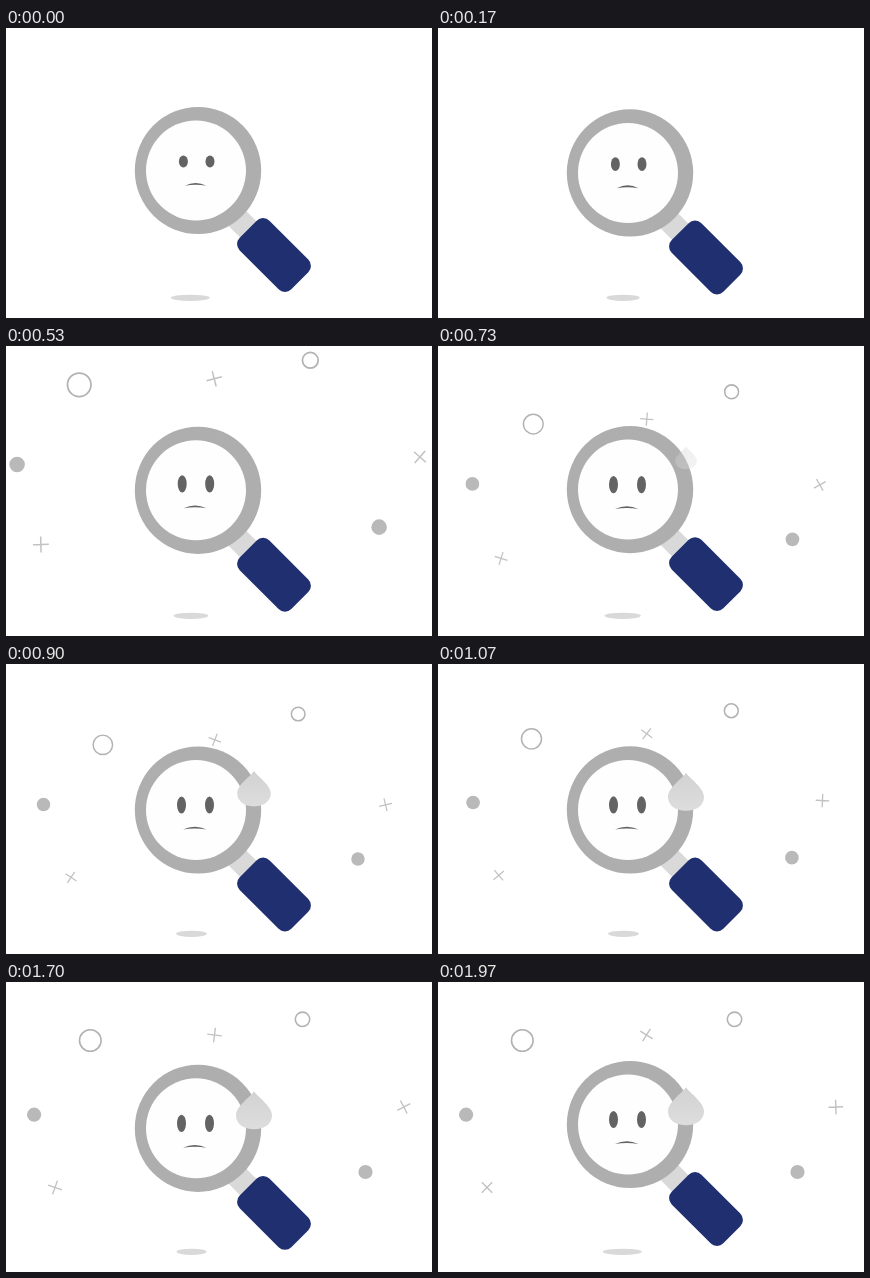
Write an HTML page with a canvas that moves like this. It is 426 by 290 pixels and loops after 2.01 s.

```html
<!DOCTYPE html>
<html lang="en">
<head>
<meta charset="utf-8">
<title>Sad magnifier</title>
<style>
html, body { margin: 0; width: 100%; height: 100%; overflow: hidden; background: #fff; }
canvas { display: block; width: 426px; height: 290px; }
</style>
</head>
<body>
<canvas id="stage"></canvas>
<script>
const W = 426, H = 290, LOOP = 2010, LAST = 1970;
const canvas = document.getElementById('stage');
const dpr = window.devicePixelRatio || 1;
canvas.width = W * dpr;
canvas.height = H * dpr;
const c = canvas.getContext('2d');

const clamp = (v) => Math.max(0, Math.min(1, v));
const lerp = (a, b, k) => a + (b - a) * k;
const ramp = (t, a, b) => clamp((t - a) / (b - a));
const smooth = (k) => k * k * (3 - 2 * k);

// Smooth curve through [time, value] points.
function curve(pts, t) {
  const n = pts.length - 1;
  if (t <= pts[0][0]) return pts[0][1];
  if (t >= pts[n][0]) return pts[n][1];
  let i = 0;
  while (t > pts[i + 1][0]) i++;
  const slope = (j) => {
    if (j === 0 || j === n) return 0;
    const [p, q, r] = [pts[j - 1], pts[j], pts[j + 1]];
    const a = (q[1] - p[1]) / (q[0] - p[0]);
    const b = (r[1] - q[1]) / (r[0] - q[0]);
    return a * b <= 0 ? 0 : 2 * a * b / (a + b);
  };
  const [t0, v0] = pts[i], [t1, v1] = pts[i + 1];
  const d = t1 - t0, k = (t - t0) / d, m = 1 - k;
  return v0 * (1 + 2 * k) * m * m + slope(i) * d * k * m * m
       + v1 * k * k * (3 - 2 * k) - slope(i + 1) * d * k * k * m;
}

// Bits burst from the bottom centre, overshoot and settle.
const ORIGIN = [212, 286];
const FIRM = [[200, .35], [330, .795], [470, 1.11], [570, 1.073], [730, .966],
  [860, .948], [1070, .962], [1370, .99], [1600, 1]];
const LOOSE = [[200, .35], [330, .79], [470, 1.105], [570, 1.065], [730, .914],
  [860, .9], [1070, .928], [1370, .987], [1600, 1]];

const BITS = [
  { type: 'ring', x: 84.3, y: 58.5, r: 10.8, path: LOOSE },
  { type: 'ring', x: 296.5, y: 37.3, r: 7.2, path: FIRM },
  { type: 'dot', x: 28.1, y: 132.7, r: 7.1, path: FIRM },
  { type: 'dot', x: 359.5, y: 190, r: 7.1, path: FIRM },
  { type: 'cross', x: 208.5, y: 53, r: 7.3, turn: -65, path: LOOSE },
  { type: 'cross', x: 49, y: 205.5, r: 7.3, turn: -52, path: LOOSE },
  { type: 'cross', x: 397.8, y: 125, r: 7.3, turn: -9, path: LOOSE }
];

function ellipse(x, y, rx, ry, fill) {
  c.fillStyle = fill;
  c.beginPath();
  c.ellipse(x, y, rx, ry, 0, 0, Math.PI * 2);
  c.fill();
}

function drawBit(b, t) {
  const s = curve(b.path, t);
  c.save();
  c.globalAlpha = ramp(t, 200, 290);
  c.translate(ORIGIN[0], ORIGIN[1]);
  c.scale(s, s);
  c.translate(b.x - ORIGIN[0], b.y - ORIGIN[1]);
  if (b.type === 'dot') {
    ellipse(0, 0, b.r, b.r, '#b9b9b9');
  } else {
    c.beginPath();
    if (b.type === 'ring') {
      c.strokeStyle = '#b2b2b2';
      c.lineWidth = 1.6;
      c.arc(0, 0, b.r, 0, Math.PI * 2);
    } else {
      c.strokeStyle = '#c2c2c2';
      c.lineWidth = 1.4;
      c.rotate((b.turn + .095 * t) * Math.PI / 180);
      c.moveTo(-b.r, 0);
      c.lineTo(b.r, 0);
      c.moveTo(0, -b.r);
      c.lineTo(0, b.r);
    }
    c.stroke();
  }
  c.restore();
}

function drawGlass() {
  c.save();
  c.translate(268, 227);
  c.rotate(Math.PI / 4);
  c.fillStyle = '#d9d9d9';
  c.fillRect(-60, -11.5, 30, 23);
  c.fillStyle = '#1f2f70';
  c.beginPath();
  c.roundRect(-36.5, -21, 73, 42, 9);
  c.fill();
  c.restore();
  ellipse(192, 142.5, 63.2, 63.6, '#aeaeae');
  ellipse(190, 142.5, 50, 50, '#fefefe');
}

function drawFace(t) {
  const k = smooth(ramp(t, 300, 690));
  const ry = lerp(6, 8.6, smooth(ramp(t, 0, 450)));
  const y = lerp(133.6, 137.5, k);
  ellipse(lerp(177.4, 175.5, k), y, 4.5, ry, '#636363');
  ellipse(lerp(204, 203.5, k), y, 4.5, ry, '#636363');
  const left = lerp(178.8, 177, k), mid = (left + 200.5) / 2, m = lerp(157.7, 162, k);
  c.fillStyle = '#636363';
  c.beginPath();
  c.moveTo(left, m);
  c.quadraticCurveTo(mid, m - 5.6, 200.5, m);
  c.quadraticCurveTo(mid, m - 2, left, m);
  c.fill();
}

function drawDrop(t) {
  const k = ramp(t, 660, 1000);
  if (!k) return;
  const s = lerp(.52, 1, smooth(k)) + .04 * Math.sin(Math.PI * k);
  c.save();
  c.globalAlpha = clamp(k * 1.7);
  c.translate(248, lerp(109, 124.3, smooth(k)));
  c.scale(s, s);
  const g = c.createLinearGradient(0, -19, 0, 19);
  g.addColorStop(0, '#d2d2d2');
  g.addColorStop(1, '#dddddd');
  c.fillStyle = g;
  c.beginPath();
  c.moveTo(0, -19);
  c.bezierCurveTo(4, -13, 18, -4, 18, 5);
  c.bezierCurveTo(18, 14, 10, 19, 0, 19);
  c.bezierCurveTo(-10, 19, -18, 14, -18, 5);
  c.bezierCurveTo(-18, -4, -4, -13, 0, -19);
  c.fill();
  c.restore();
}

function draw(time) {
  const t = Math.min(time % LOOP, LAST);
  const phase = (t / (LAST / 3)) % 1;
  const bob = 1 - Math.abs(1 - 2 * phase);
  c.setTransform(dpr, 0, 0, dpr, 0, 0);
  c.fillStyle = '#fff';
  c.fillRect(0, 0, W, H);
  ellipse(184.3 + 1.6 * bob, 269.8, 19.5 - 5.5 * bob, 3.1, '#d9d9d9');
  for (const b of BITS) drawBit(b, t);
  c.translate(0, 4.7 * bob);
  drawGlass();
  drawFace(t);
  drawDrop(t);
}

const start = performance.now();
function tick() {
  draw(performance.now() - start);
  requestAnimationFrame(tick);
}
tick();
</script>
</body>
</html>
```
